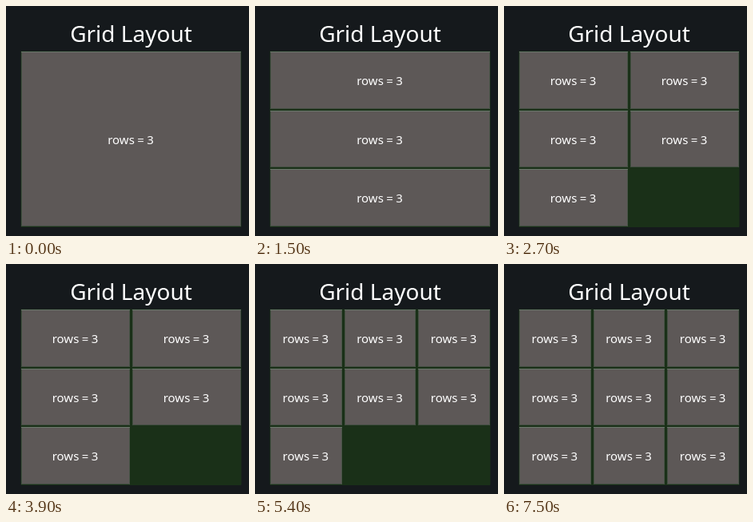
Animation, 304 px wide and 288 px high, one loop 8 s. Source, as an HTML page:

```html
<!DOCTYPE html>
<html lang="en">
<head>
<meta charset="utf-8">
<title>Grid Layout</title>
<style>
  html, body { margin: 0; width: 100%; height: 100%; overflow: hidden; background: #15191c; }
  body { position: relative; color: #fff; font-family: "Noto Sans", "Open Sans", sans-serif; }
  h1 {
    position: absolute; left: 19px; top: 14px; width: 275px; margin: 0;
    font-size: 28px; font-weight: 400; line-height: 40px; text-align: center;
  }
  #grid {
    position: absolute; left: 19px; top: 57.45px; width: 275px; height: 218.5px;
    display: grid; gap: 2px 3px; background: #1a3018; box-shadow: 0 0 0 .5px #1a3018, 0 1px #1a3018;
  }
  .cell {
    display: flex; align-items: center; justify-content: center; padding-right: 1px;
    font-size: 15px; line-height: 20px; white-space: pre; word-spacing: -.5px; background: #5d5857;
    box-shadow: inset 0 1px #69776a, inset 1px 0 #434f41, inset -1px 0 #4a5448, inset 0 -1px #414d40;
  }
</style>
</head>
<body>
<h1>Grid Layout</h1>
<div id="grid"></div>
<script>
const LOOP = 8000;
const MAX_ROWS = 3;
const addTimes = [0, 900, 1500, 2100, 2700, 4800, 5400, 6300, 6900];
const grid = document.getElementById('grid');
let shown = 0;

function layout(count) {
  const cols = Math.ceil(count / MAX_ROWS);
  const rows = Math.ceil(count / cols);
  grid.style.gridTemplate = `repeat(${rows}, 1fr) / repeat(${cols}, 1fr)`;
  grid.innerHTML = '<div class="cell">rows = 3</div>'.repeat(count);
}

function frame() {
  const t = performance.now() % LOOP;
  const count = addTimes.filter(start => start <= t).length;
  if (count !== shown) layout(shown = count);
  requestAnimationFrame(frame);
}
frame();
</script>
</body>
</html>
```
